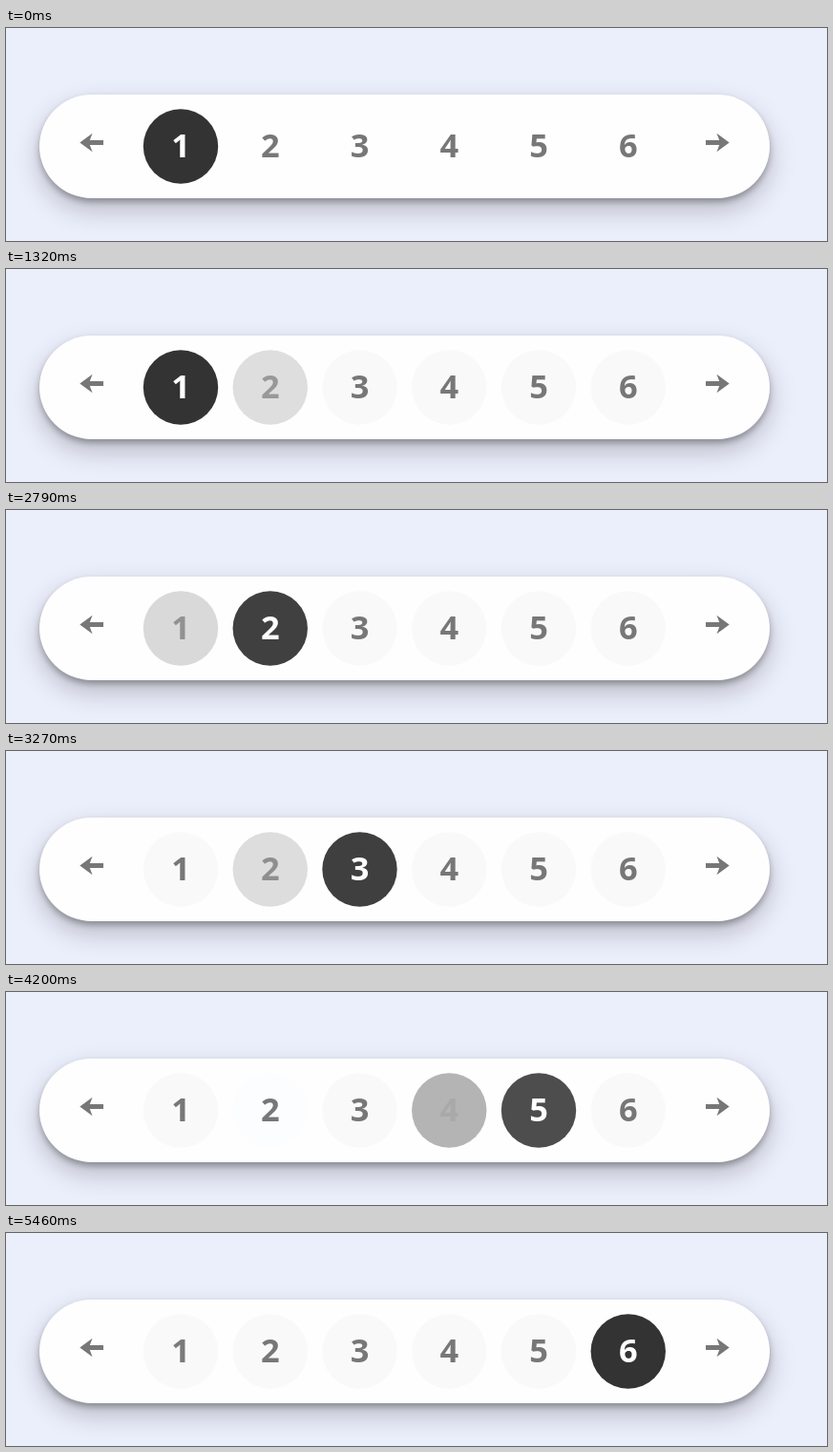
An HTML page that plays this animation: 860x224 px, repeating every 6390 ms.

```html
<!DOCTYPE html>
<html lang="en">
<head>
<meta charset="utf-8">
<title>Pagination</title>
<style>
  html, body { margin: 0; width: 100%; height: 100%; overflow: hidden; background: #ebeefb; }
  .bar {
    position: absolute; left: 35px; top: 70px; width: 765px; height: 109px;
    border-radius: 54.5px; background: #fefefe;
    box-shadow: 0 12px 28px rgba(0, 0, 0, .22), 0 4px 6px rgba(0, 0, 0, .28);
  }
  svg { position: absolute; left: 0; top: 0; display: block; }
  text { font: 700 34.4px "Open Sans", "Noto Sans", sans-serif; text-anchor: middle; }
  .arrow { fill: #777; animation: 6390ms step-end infinite; }
  #prev { animation-name: prev; }
  #next { animation-name: next; }
  @keyframes prev { 0% { fill: #777; } 24.883% { fill: #333; } 32.864% { fill: #777; } }
  @keyframes next { 0% { fill: #777; } 13.615% { fill: #333; } 14.554% { fill: #777; } }
</style>
</head>
<body>
<div class="bar"></div>
<svg id="stage" width="860" height="224" viewBox="0 0 860 224">
  <defs>
    <path id="shape" d="M77.3 120.5 90.5 110.8 87.8 118H102V123H87.8L90.5 130.2Z"/>
  </defs>
  <use id="prev" class="arrow" href="#shape"/>
  <use id="next" class="arrow" href="#shape" transform="translate(835 0) scale(-1 1)"/>
</svg>
<script>
const LOOP = 6390, STEP = 30, FADE = 300;

// Each state is [circle grey, digit grey].
const idle = [255, 119], hover = [119, 255], active = [51, 255];

// Faint tints that stay behind once a circle has faded.
const grey = [249, 249, 249], blue = [252, 253, 255], cream = [255, 255, 251];

// Per page: [time, state, tint left afterwards]
const pages = [
  [[2637, idle], [5000, hover], [5225, idle]],
  [[1090, hover], [1229, idle, blue], [2315, hover], [2637, active],
   [3110, idle, blue], [4955, hover], [5000, idle]],
  [[1062, hover], [1090, idle], [2895, hover], [3110, active],
   [3653, idle], [4920, hover], [4955, idle]],
  [[1032, hover], [1062, idle], [3350, hover], [3653, active],
   [4090, idle, cream], [4885, hover], [4920, idle]],
  [[1000, hover], [1032, idle], [3840, hover], [4090, active],
   [4553, idle], [4845, hover], [4885, idle]],
  [[960, hover], [1000, idle], [4290, hover], [4553, active]]
];

// The CSS "ease" curve: cubic-bezier(.25, .1, .25, 1)
function ease(x) {
  if (x <= 0) return 0;
  if (x >= 1) return 1;
  const curve = (a, b, s) => 3 * a * s * (1 - s) ** 2 + 3 * b * s * s * (1 - s) + s ** 3;
  let lo = 0, hi = 1;
  for (let i = 0; i < 24; i++) {
    const mid = (lo + hi) / 2;
    if (curve(.25, .25, mid) < x) lo = mid; else hi = mid;
  }
  return curve(.1, 1, lo);
}

const mix = (a, b, k) => a.map((v, i) => v + (b[i] - v) * k);

// Replays the events up to t; a reversed fade is shortened as in CSS transitions.
function pose(events, start, t) {
  let from = start, to = start, origin = start, begin = -FADE, part = 1, tint = null;
  for (const [at, state, rest = grey] of events) {
    if (at > t) break;
    const k = ease((at - begin) / (FADE * part));
    const now = mix(from, to, k);
    const reversed = k < 1 && state === origin;
    part = reversed ? k * part + 1 - part : 1;
    origin = to;
    from = now;
    to = state;
    begin = at;
    tint = rest;
  }
  const [fill, ink] = mix(from, to, ease((t - begin) / (FADE * part)));
  return { fill, ink, tint };
}

const rgb = channels => `rgb(${channels.map(Math.round)})`;

function add(tag, attrs) {
  const el = document.createElementNS("http://www.w3.org/2000/svg", tag);
  for (const name in attrs) el.setAttribute(name, attrs[name]);
  return document.getElementById("stage").appendChild(el);
}

const items = pages.map((events, i) => {
  const x = 183 + 93.75 * i;
  const disc = add("circle", { cx: x, cy: 124.5, r: 39.2 });
  const digit = add("text", { x, y: 136 });
  digit.textContent = i + 1;
  return { events, disc, digit, start: i ? idle : active };
});

function draw() {
  const t = Math.floor(performance.now() % LOOP / STEP) * STEP;
  for (const { events, disc, digit, start } of items) {
    const { fill, ink, tint } = pose(events, start, t);
    const limit = tint || [254, 254, 254];
    disc.setAttribute("fill", rgb(limit.map(c => Math.min(c, fill))));
    digit.setAttribute("fill", rgb([ink, ink, ink]));
  }
  requestAnimationFrame(draw);
}
draw();
</script>
</body>
</html>
```
